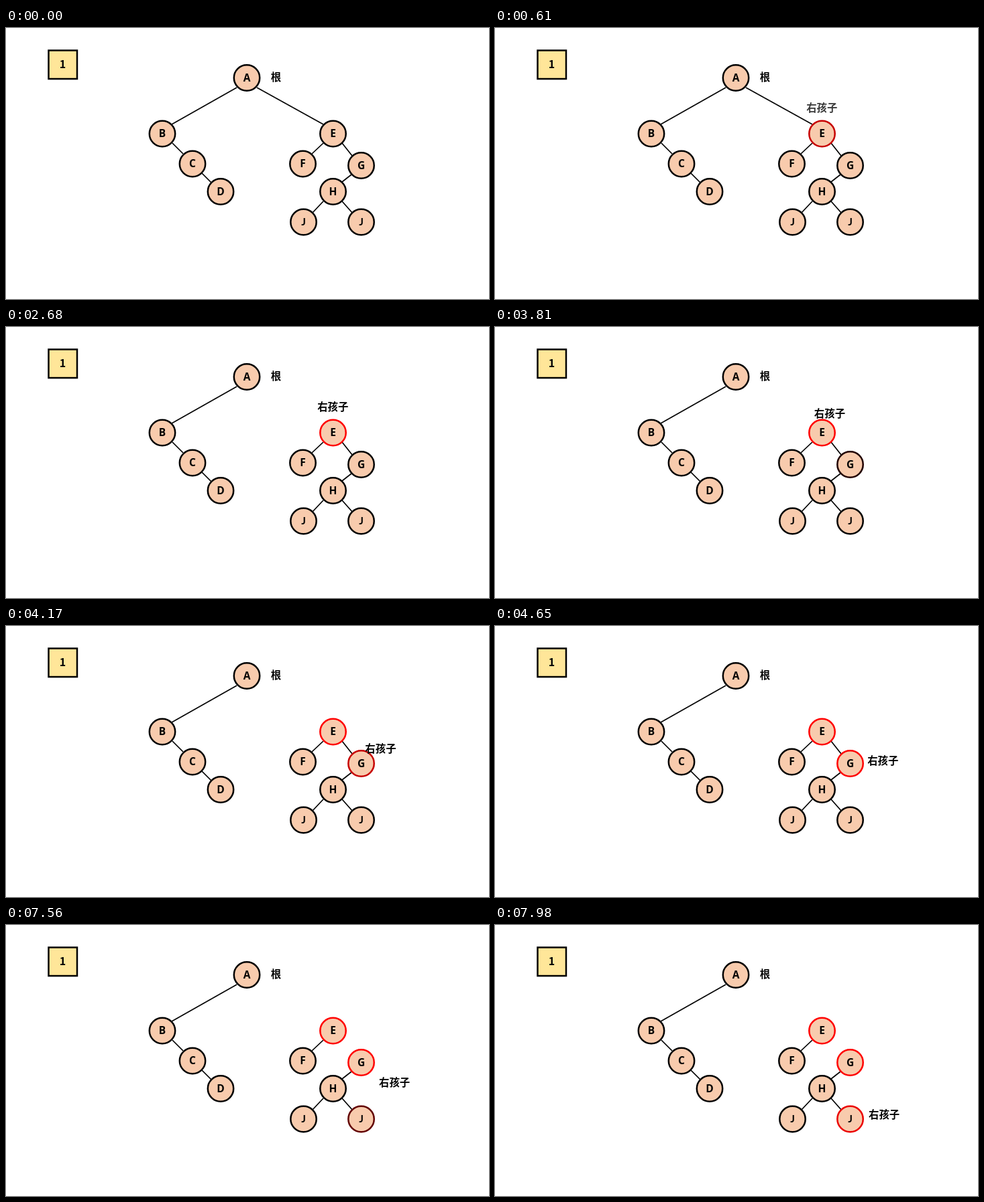
These frames come from a looping animation (720 px wide and 405 px high, 8000 ms). An HTML page with a canvas:

```html
<!DOCTYPE html>
<html lang="zh">
<head>
<meta charset="utf-8">
<title>Tree conversion</title>
<style>
  html, body { margin: 0; width: 100%; height: 100%; overflow: hidden; background: #fff; }
  canvas { display: block; width: 720px; height: 405px; }
</style>
</head>
<body>
<canvas id="stage"></canvas>
<script>
const W = 720, H = 405, LOOP = 8000, STEP = 60;
const CJK = '"Noto Sans CJK SC", "Noto Sans CJK JP", "Noto Sans CJK", sans-serif';
const LATIN = '"Open Sans", "Noto Sans", sans-serif';
const canvas = document.getElementById('stage');
const ctx = canvas.getContext('2d');
const dpr = window.devicePixelRatio || 1;
canvas.width = W * dpr;
canvas.height = H * dpr;

const nodes = {
  A: [359, 74.5], B: [233, 158], C: [278, 203], D: [320, 244.5],
  E: [487.5, 158], F: [442.5, 203], G: [529.5, 205.5], H: [487.5, 244.5],
  J1: [443.5, 290], J2: [529.5, 290]
};

const edges = [
  [344, 89, 247, 144], [248, 172, 264, 188], [292, 217, 306, 231],
  [473, 172, 456, 188], [515, 219, 501, 230],
  [473, 259, 457, 276], [501, 259, 516, 276]
];

// Edges that get crossed out and then removed
const cuts = [
  { line: [374, 89, 473, 144], mark: [423.5, 118], show: 1700, hide: 2440, fade: 300 },
  { line: [501, 172, 516, 191], mark: [510, 182.5], show: 5320, hide: 6130, fade: 240 }
];

// Progress 0..1 in steps; "first" is the time of the first visible change
function progress(t, first, duration) {
  if (t < first) return 0;
  const step = Math.floor((t - first) / STEP) + 1;
  return Math.min(1, step * STEP / duration);
}

// cubic-bezier(.25, .1, .25, 1)
function ease(x) {
  if (x <= 0 || x >= 1) return x;
  const curve = (s, a, b) => 3 * s * (1 - s) * (1 - s) * a + 3 * s * s * (1 - s) * b + s * s * s;
  let lo = 0, hi = 1;
  for (let i = 0; i < 24; i++) {
    const mid = (lo + hi) / 2;
    if (curve(mid, 0.25, 0.25) < x) lo = mid; else hi = mid;
  }
  return curve(lo, 0.1, 1);
}

function text(str, x, y, font, alpha = 1) {
  ctx.globalAlpha = alpha;
  ctx.fillStyle = '#000';
  ctx.font = font;
  ctx.fillText(str, x, y);
  ctx.globalAlpha = 1;
}

function line([x1, y1, x2, y2], alpha = 1) {
  ctx.globalAlpha = alpha;
  ctx.strokeStyle = '#000';
  ctx.lineWidth = 1.7;
  ctx.beginPath();
  ctx.moveTo(x1, y1);
  ctx.lineTo(x2, y2);
  ctx.stroke();
  ctx.globalAlpha = 1;
}

function node(name, red) {
  const [x, y] = nodes[name];
  ctx.beginPath();
  ctx.arc(x, y, 19.2, 0, Math.PI * 2);
  ctx.fillStyle = '#f8cbad';
  ctx.fill();
  ctx.lineWidth = 2.5;
  ctx.strokeStyle = `rgb(${Math.round(255 * red)},0,0)`;
  ctx.stroke();
  // Lato keeps the J on the baseline
  const font = name[0] === 'J' ? 'Lato, sans-serif' : LATIN;
  text(name[0], x, y + 5.2, `bold 15.5px ${font}`);
}

function cross([x, y], alpha) {
  const a = 11, b = 3;
  ctx.save();
  ctx.translate(x, y);
  ctx.rotate(Math.PI / 4);
  ctx.globalAlpha = alpha;
  ctx.beginPath();
  [[-b, -a], [b, -a], [b, -b], [a, -b], [a, b], [b, b],
   [b, a], [-b, a], [-b, b], [-a, b], [-a, -b], [-b, -b]]
    .forEach(([px, py]) => ctx.lineTo(px, py));
  ctx.closePath();
  ctx.fillStyle = '#f00';
  ctx.fill();
  ctx.lineWidth = 1.2;
  ctx.strokeStyle = '#222';
  ctx.stroke();
  ctx.restore();
}

function draw(t) {
  const toE = ease(progress(t, 190, 1000));
  const toG = ease(progress(t, 3750, 1000));
  const toJ = ease(progress(t, 7380, 1000));
  const red = { E: toE, G: toG, J2: toJ };

  ctx.setTransform(dpr, 0, 0, dpr, 0, 0);
  ctx.fillStyle = '#fff';
  ctx.fillRect(0, 0, W, H);
  ctx.textAlign = 'center';

  ctx.fillStyle = '#ffe699';
  ctx.fillRect(63.5, 33.5, 42.5, 42.5);
  ctx.lineWidth = 2.5;
  ctx.strokeStyle = '#000';
  ctx.strokeRect(63.5, 33.5, 42.5, 42.5);
  text('1', 84.5, 59.5, `bold 16px ${CJK}`);

  edges.forEach(e => line(e));
  cuts.forEach(c => line(c.line, 1 - progress(t, c.hide, c.fade)));
  Object.keys(nodes).forEach(name => node(name, red[name] || 0));
  cuts.forEach(c => {
    const alpha = progress(t, c.show, 500) * (1 - progress(t, c.hide, c.fade));
    if (alpha > 0) cross(c.mark, alpha);
  });

  const label = `bold 15.4px ${CJK}`;
  text('根', 402.5, 78.7, label);
  text('右孩子', 487.3 + 91 * toG + 2 * toJ, 124.8 + 82 * toG + 89 * toJ, label, toE);
}

function tick() {
  draw(performance.now() % LOOP);
  requestAnimationFrame(tick);
}
tick();
</script>
</body>
</html>
```
